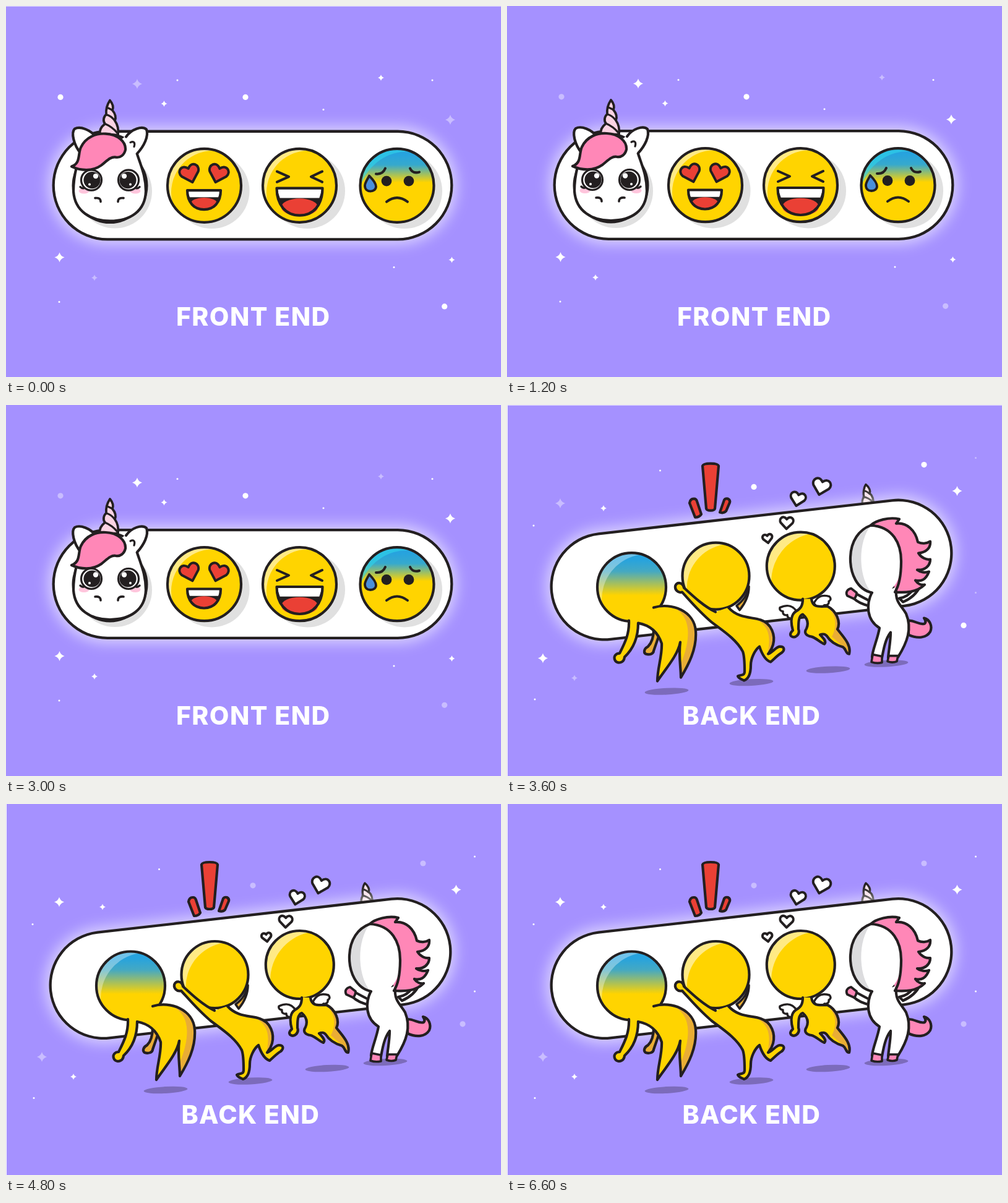
An HTML page for the animation above (7200 ms loop, 800 by 600 pixels).

```html
<!DOCTYPE html>
<html lang="en">
<head>
<meta charset="utf-8">
<title>Front end, back end</title>
<style>
html, body { margin: 0; width: 100%; height: 100%; overflow: hidden; background: #fff; }
svg { display: block; width: 100vw; height: 100vh; }
text { font: 800 41px Inter, "Open Sans", sans-serif; letter-spacing: 1.4px; fill: #fff; text-anchor: middle; }
.ink { stroke: #231f20; stroke-width: 4.2; stroke-linejoin: round; stroke-linecap: round; }
.ink path, .ink circle { vector-effect: non-scaling-stroke; }
</style>
</head>
<body>
<svg id="stage" viewBox="0 0 800 600">
  <defs>
    <filter id="blur" filterUnits="userSpaceOnUse" x="0" y="0" width="800" height="600"><feGaussianBlur stdDeviation="11"/></filter>
    <linearGradient id="chill" x2="0" y2="1">
      <stop offset=".08" stop-color="#27a3de"/><stop offset=".22" stop-color="#36a9cd"/>
      <stop offset=".46" stop-color="#ffd400"/>
    </linearGradient>
    <linearGradient id="chillBack" x2="0" y2="1">
      <stop offset=".1" stop-color="#27a3de"/><stop offset=".27" stop-color="#45a9c2"/>
      <stop offset=".62" stop-color="#ffd400"/>
    </linearGradient>
  </defs>
  <g id="world">
    <rect width="800" height="620" fill="#a591ff"/>
    <g id="front"></g>
    <g id="back"></g>
  </g>
</svg>
<script>
const STEP = 600, LOOP = 7200;
const INK = '#231f20', GOLD = '#ffd400', SHADE = '#e9ad35', RED = '#ea4035', PINK = '#ff87b7';
const byId = id => document.getElementById(id);

// Basic shapes
const fill = (d, c) => `<path d="${d}" fill="${c}" stroke="none"/>`;
const shape = (d, c, w = 4.2) => `<path d="${d}" fill="${c}" stroke-width="${w}"/>`;
const line = (d, w) => shape(d, 'none', w);
const dot = (x, y, r, c = INK) => `<circle cx="${x}" cy="${y}" r="${r}" fill="${c}" stroke="none"/>`;
const oval = (x, y, rx, ry, c, turn = 0) =>
  `<ellipse cx="${x}" cy="${y}" rx="${rx}" ry="${ry}" fill="${c}" stroke="none" transform="rotate(${turn} ${x} ${y})"/>`;
const ink = s => `<g class="ink">${s}</g>`;
const heart = (x, y, size, turn, c) =>
  `<g transform="translate(${x} ${y}) rotate(${turn}) scale(${size})">` +
  shape('M0 15L-14 1C-20 -8 -9 -19 0 -8C9 -19 20 -8 14 1Z', c, 4) + '</g>';

// White capsule with a soft glow
function pill(x1, y1, x2, y2, size) {
  const bar = (w, c, extra = '') =>
    `<path d="M${x1} ${y1}L${x2} ${y2}" stroke="${c}" stroke-width="${w}" stroke-linecap="round" ${extra}/>`;
  return bar(size + 12, '#fff', 'filter="url(#blur)" opacity=".58"') + bar(size, INK) + bar(size - 8.6, '#fff');
}

// Crescent of light on the upper left of a ball
function gleam(x, y, r, w, from, to, c, alpha) {
  const rad = Math.PI / 180, half = (to - from) / 2 * rad;
  const chord = r * Math.sin(half), sag = r * (1 - Math.cos(half)) - w;
  const inner = (chord * chord + sag * sag) / (2 * sag);
  const at = a => `${x + r * Math.cos(a * rad)} ${y + r * Math.sin(a * rad)}`;
  return `<path d="M${at(from)}A${r} ${r} 0 0 1 ${at(to)}A${inner} ${inner} 0 0 0 ${at(from)}Z" ` +
    `fill="${c}" opacity="${alpha}" stroke="none"/>`;
}

function ball(x, y, r, c, { w = 9, from = 152, to = 285, light = '#fff', alpha = .52 } = {}) {
  return dot(x, y, r, c) + gleam(x, y, r - 1, w, from, to, light, alpha) +
    `<circle cx="${x}" cy="${y}" r="${r}" fill="none"/>`;
}

const body = (d, shade) => fill(d, GOLD) + fill(shade, SHADE) + line(d);
const floor = (x, y) => oval(x, y, 35.5, 5.4, '#7c6bbb', -3);

// Stars: kind, x, y, phase in which the star is dim
function stars(list) {
  return list.map(([kind, x, y, dim = -1]) => {
    const r = { big: 8, small: 5, dot: 4.6, tiny: 1.5 }[kind], q = r * .22;
    const mark = r > 4.7
      ? fill(`M${x} ${y - r}Q${x + q} ${y - q} ${x + r} ${y}Q${x + q} ${y + q} ${x} ${y + r}` +
        `Q${x - q} ${y + q} ${x - r} ${y}Q${x - q} ${y - q} ${x} ${y - r}Z`, '#fff')
      : dot(x, y, r, '#fff');
    return `<g data-dim="${dim}">${mark}</g>`;
  }).join('');
}

function grin(x, y, w, h) {
  const a = w / 2, mouth = `M${x - a} ${y}H${x + a}C${x + a} ${y + h * .62} ${x + a * .6} ${y + h} ${x} ${y + h}` +
    `S${x - a} ${y + h * .62} ${x - a} ${y}Z`;
  const gum = y + h * .36;
  return fill(mouth, INK) +
    fill(`M${x - a} ${y}H${x + a}L${x + a * .86} ${gum}H${x - a * .86}Z`, '#fff') +
    oval(x, y + h * .7, a * .8, h * .32, RED) + line(mouth);
}

function unicornFace() {
  const eye = (x, side) =>
    `<circle cx="${x}" cy="281" r="16.5" fill="#fff" stroke-width="3.2"/>` + dot(x + side, 281, 13.6) +
    dot(x + side * 7, 274.5, 4.2, '#fff') + dot(x - side * 3, 288, 2, '#fff') +
    line(`M${x - side * 12} 294q${-side * 3} 1 ${-side * 6} -2`, 3.4);
  const horn = shape('M152 207C150 199 155 194 160 190C156 185 158 178 162 175C161 166 164 158 168 152C173 158 174 163 172 168' +
    'C177 174 178 180 176 185C181 192 182 200 181 208Z', '#fbd3e3', 3.8) +
    line('M164 164Q169 166 172 168M162 175Q170 177 176 185M160 190Q172 195 180 205', 3.2);
  const leftEar = shape('M121 238C109 224 105 204 111 198C120 193 137 200 145 211Z', '#fff');
  const rightEar = fill('M212 237L194 209L186 216L200 242Z', '#fff') +
    shape('M194 211C203 198 220 193 227 199C231 210 223 226 212 238', '#fff') +
    line('M201 220C207 217 209 221 207 227', 3.2);
  return dot(168, 290, 61.5) + horn + leftEar +
    shape('M128 226C116 244 109 274 109 299C111 332 138 347 168 347C201 347 225 331 226 299' +
      'C226 274 218 258 211 236C200 203 147 197 128 226Z', '#fff') + rightEar +
    shape('M106 259C121 254 116 238 121 228C129 211 146 205 161 206C181 207 194 219 193 232C191 241 184 245 178 244' +
      'C169 242 162 251 154 257C140 267 121 266 106 259Z', PINK) +
    oval(126, 298.5, 8.5, 4.5, '#ffc5dc') + oval(209, 298.5, 8.5, 4.5, '#ffc5dc') +
    eye(138, 1) + eye(198, -1) +
    line('M144 310q9 -1 9 6M190 310q-9 -1 -9 6', 3.6);
}

function frontScene() {
  const shadows = dot(176, 299, 60, '#e0e0e0') +
    [320.5, 475, 632].map(x => dot(x + 12, 298.5, 61, '#e0e0e0')).join('');
  const mouths = grin(320, 297.5, 54, 31) + grin(474.5, 294, 74, 44);
  const worry = dot(615, 282.5, 8.4) + dot(651, 282.5, 8.4) +
    line('M598 271Q609 272 613 262M653 262Q657 271 668 268M615 316Q632 303 649 316', 4) +
    shape('M587 274C594 281 598 286 598 291.5C598 296 594 299 589 299C584 299 580 296 580 290C580 285 584 280 587 274Z', '#4a8fdb', 3.8);
  return stars([
    ['big', 212, 125.5, 0], ['big', 718, 183.5, 0], ['big', 86.5, 406, 1],
    ['small', 255.5, 157.5], ['small', 606, 115.5, 2], ['small', 143, 439, 0], ['small', 720.5, 410, 1],
    ['dot', 88, 146.8, 2], ['dot', 387, 146.8, 1], ['dot', 708.7, 485.3, 2],
    ['tiny', 277, 119.5], ['tiny', 513, 166.8], ['tiny', 689, 119.5], ['tiny', 627, 422], ['tiny', 86, 478]
  ]) + pill(164, 289.5, 633, 289.5, 179) + shadows + ink(
    unicornFace() +
    ball(320.5, 289.7, 59.5, GOLD) + ball(474.5, 289.7, 59.5, GOLD) +
    ball(632, 289.7, 59.5, 'url(#chill)', { from: 180, to: 290, light: '#2fd8ec', alpha: .6 }) +
    heart(297, 270, 1, -17, RED) + heart(343, 270, 1, 17, RED) +
    line('M438 267L457 275.5L438 284M511 267L493 275.5L511 284', 4) + mouths + worry
  ) + '<text x="399.7" y="516.6">FRONT END</text>';
}

function alarm() {
  return shape('M316 98Q317 94 329 94Q341 94 342 98L336 167Q335 170 329 170Q323 170 322 167Z', RED) +
    shape('M295 158Q296 151 302 151Q306 151 307 155L314 176Q311 181 304 181Z', RED) +
    shape('M351 153Q353 150 357 151Q361 153 360 157L354 171Q350 175 344 173Z', RED);
}

function crawler() {
  return shape('M237 362C237 375 233 385 228 390C222 393 220 399 224 402C230 404 237 402 237 397L245 374Z', SHADE) +
    ball(201.5, 294, 55.5, 'url(#chillBack)', { w: 13, alpha: .34 }) +
    body('M237 327C266 318 303 333 305 365C307 394 293 420 281 440C281 424 277 404 280 383' +
      'C276 404 258 424 243 446C243 425 251 405 250 385C243 364 228 355 212 352C212 375 205 393 190 407' +
      'C189 417 179 418 175 413C171 406 176 401 182 401C190 385 198 370 197 348',
      'M274 330C308 335 312 364 300 402L281 437L281 418C296 382 299 346 274 330Z');
}

function runner() {
  return shape('M391 293C389 306 382 316 371 324L376 331C386 319 391 306 391 293Z', SHADE, 3.6) +
    ball(337.5, 276, 54, GOLD, { w: 13 }) +
    body('M358 327C374 345 396 342 410 347C428 353 434 372 430 387C428 395 424 399 422 402C430 399 434 391 441 390' +
      'C449 390 449 396 444 400C437 404 431 411 426 415C417 412 412 402 408 390C400 396 394 410 394 420C394 432 392 442 383 445' +
      'C380 443 374 442 373 438C378 435 384 438 384 430C384 418 384 406 381 398C370 377 345 362 330 350' +
      'C310 333 295 315 283 302C276 304 271 298 272 292C275 285 284 286 286 295C300 308 318 325 337 334',
      'M400 345C428 347 436 374 428 390L421 402C427 376 424 355 400 345Z');
}

function cupid() {
  const wings = shape('M469 335C462 322 452 322 441 327C440 331 443 333 446 333C445 338 449 340 453 339C453 345 460 346 464 343Z', '#fff', 3.4) +
    shape('M496 320C502 308 510 306 521 309C525 313 522 316 520 317C521 321 517 324 513 323C510 327 504 327 500 325Z', '#fff', 3.4);
  return wings + ball(474.8, 260, 55, GOLD, { w: 15 }) +
    body('M492 313C494 328 505 325 518 325C532 332 540 350 534 362C543 374 557 387 553 402C547 402 549 395 543 391' +
      'C533 388 523 383 517 373C513 368 509 370 506 371C511 376 517 382 513 386C505 383 500 376 492 374' +
      'C484 373 479 368 484 361C488 352 486 345 478 338C471 340 471 352 471 362C474 370 466 378 459 373' +
      'C456 369 460 366 462 364C458 350 459 338 467 333C474 329 478 325 478 313',
      'M518 327C538 335 540 354 533 363C543 374 555 387 552 400L544 391L525 374C534 358 532 338 518 327Z');
}

function unicornBack() {
  return shape('M640 318C652 313 662 305 668 292L656 298Q648 310 634 312Z', '#fff') +
    shape('M649 348C660 348 668 356 675 353C678 350 676 347 674 344C683 346 688 357 684 366C678 376 664 378 649 371Z', PINK) +
    shape('M588 194C596 186 618 180 634 184L629 191C646 189 660 202 664 221C670 224 678 224 684 220' +
      'C685 231 677 238 665 239C670 247 678 250 684 249C684 260 675 267 663 266C668 270 676 271 682 269' +
      'C677 282 670 285 660 283C664 289 670 291 675 290C662 303 644 303 627 302Z', PINK) +
    shape('M596 320C588 318 576 311 565 305L559 311C567 319 577 323 588 325', '#fff') +
    shape('M565 303L556 296C549 298 547 303 550 308L561 313Q565 309 565 303Z', PINK, 3.8) +
    shape('M590 302C580 322 581 347 602 360C599 378 591 394 590 407L606 408C609 392 612 377 620 367' +
      'C620 382 617 396 616 408L632 407C647 383 655 361 645 337C638 324 627 319 629 297', '#fff') +
    shape('M591 403L606 406L606 416Q597 418 589 415Z', PINK, 3.6) +
    shape('M617 405L632 405L630 414Q623 417 615 414Z', PINK, 3.6) +
    fill('M588 194C624 196 637 224 637 252C637 278 628 303 600 304C570 302 554 275 555 245C556 219 569 201 588 194Z', '#fff') +
    fill('M588 194C562 202 552 227 556 258C560 285 575 301 589 303C568 278 566 223 588 194Z', '#dcdcde') +
    fill('M591 299Q610 304 628 294L622 320H594Z', '#fff') +
    line('M590 303C566 298 554 272 555 245C556 219 569 201 588 194C624 196 637 224 637 252C637 275 634 291 627 302');
}

function backScene() {
  const horn = shape('M575 164C573 157 574 152 577 148C575 142 577 132 580 128C585 132 588 138 586 142C591 146 593 152 592 162Z', '#f8dfe8', 3.4) +
    line('M577 138Q582 139 586 143M576 148Q584 149 592 157', 3);
  const love = [[421, 215, .5, -8], [452, 189.5, .68, 2], [470, 151, .78, 13], [508, 131, .92, 15]];
  return stars([
    ['big', 86, 158.5, 0], ['big', 727.5, 138.5, 1], ['big', 58, 409, 2],
    ['small', 156, 166.5, 1], ['small', 109, 441, 0],
    ['dot', 399, 131.8, 2], ['dot', 674, 96, 2], ['dot', 738, 355.8, 2],
    ['tiny', 247.5, 105.5], ['tiny', 43, 194.5], ['tiny', 757.5, 85, 0], ['tiny', 757.5, 303, 0], ['tiny', 45, 475.5]
  ]) + ink(horn) + pill(157.5, 293, 632.5, 239, 176) +
    floor(258, 462.5) + floor(395, 448) + floor(519, 427.5) + floor(613, 417.5) +
    ink(alarm() + love.map(h => heart(...h, '#fff')).join('') +
      crawler() + runner() + cupid() + unicornBack()) +
    fill('M0 0H1V620H0Z', '#fff') + '<text x="395.4" y="516.6">BACK END</text>';
}

const world = byId('world'), front = byId('front'), back = byId('back');
front.innerHTML = frontScene();
back.innerHTML = backScene();
const twinkles = [...document.querySelectorAll('[data-dim]')];
const start = performance.now();

function draw(time) {
  const step = Math.floor(time % LOOP / STEP), phase = step % 3, isFront = step < LOOP / STEP / 2;
  front.style.display = isFront ? '' : 'none';
  back.style.display = isFront ? 'none' : '';
  // The picture sits slightly lower except in the last phase
  world.setAttribute('transform', `translate(0 ${phase < 2 ? .6 : 0})`);
  for (const star of twinkles) star.setAttribute('opacity', +star.dataset.dim === phase ? .4 : 1);
}

function loop() {
  draw(performance.now() - start);
  requestAnimationFrame(loop);
}
loop();
</script>
</body>
</html>
```
